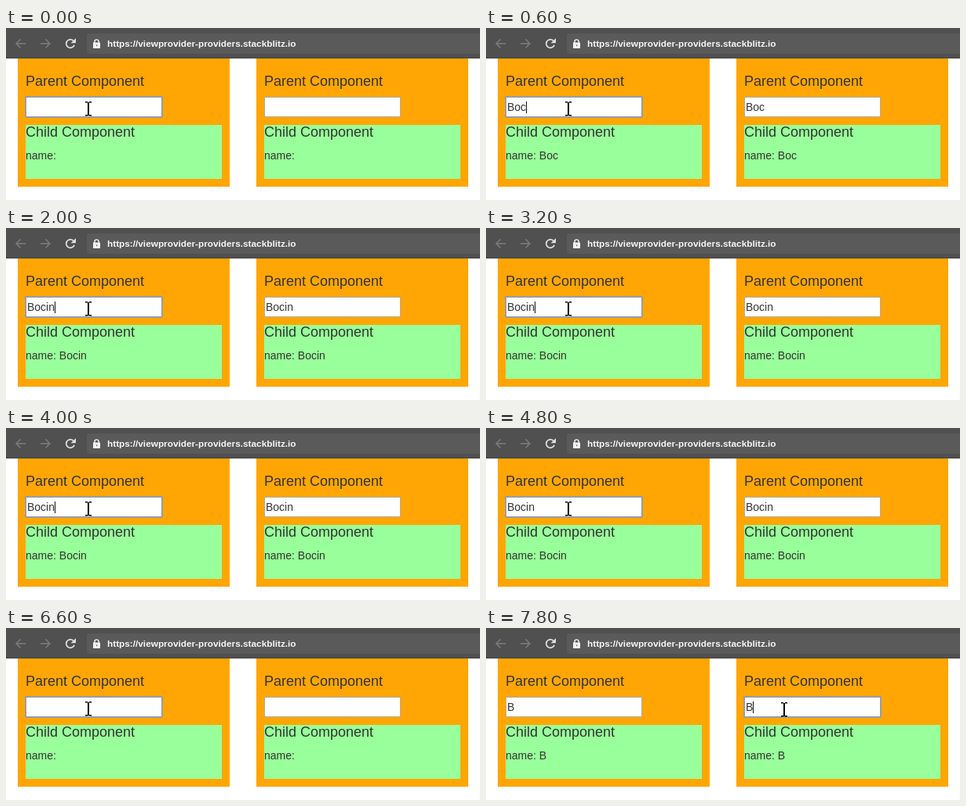
Recreate the animation shown at these times as an HTML page with a canvas. Size 604x220 px, loop 8 s.

```html
<!DOCTYPE html>
<html lang="en">
<head>
<meta charset="utf-8">
<title>Two synced forms</title>
<style>
  html, body { margin: 0; width: 100%; height: 100%; overflow: hidden; background: #fff; }
  canvas { display: block; width: 604px; height: 220px; }
</style>
</head>
<body>
<canvas id="stage"></canvas>
<script>
const W = 604, H = 220, LOOP = 8000, STEP = 200;
const NAME = 'Bocin';
const SANS = '"Liberation Sans", Arial, sans-serif';
const canvas = document.getElementById('stage');
const ctx = canvas.getContext('2d');
const ratio = window.devicePixelRatio || 1;
canvas.width = W * ratio;
canvas.height = H * ratio;
ctx.scale(ratio, ratio);

const clamp = (v, lo, hi) => Math.min(hi, Math.max(lo, v));
const ease = p => p * p * (3 - 2 * p);

function rect(x, y, w, h, color) {
  ctx.fillStyle = color;
  ctx.fillRect(x, y, w, h);
}

function frame(x, y, w, h, color) {
  ctx.strokeStyle = color;
  ctx.lineWidth = 1;
  ctx.strokeRect(x + .5, y + .5, w - 1, h - 1);
}

function text(str, x, y, size, color = '#333', weight = '') {
  ctx.font = `${weight} ${size}px ${SANS}`;
  ctx.fillStyle = color;
  ctx.fillText(str, x, y);
}

function path(points, color, width) {
  ctx.beginPath();
  points.forEach(([x, y]) => ctx.lineTo(x, y));
  ctx.strokeStyle = color;
  ctx.lineWidth = width;
  ctx.stroke();
}

function navArrow(x, dir) {
  const tip = x + dir * 6;
  path([[x - dir * 6, 20], [tip, 20]], '#7b7b7b', 1.6);
  path([[tip - dir * 5.5, 14.5], [tip, 20], [tip - dir * 5.5, 25.5]], '#7b7b7b', 1.6);
}

function reload() {
  ctx.beginPath();
  ctx.arc(82, 20, 5.3, .35, Math.PI * 1.78);
  ctx.strokeStyle = '#dedede';
  ctx.lineWidth = 1.8;
  ctx.stroke();
  ctx.beginPath();
  ctx.moveTo(89, 13);
  ctx.lineTo(89, 19.3);
  ctx.lineTo(82.7, 19.3);
  ctx.fillStyle = '#dedede';
  ctx.fill();
}

function lock() {
  ctx.beginPath();
  ctx.arc(115.5, 17.5, 2.6, Math.PI, 0);
  ctx.lineTo(118.1, 20);
  ctx.moveTo(112.9, 17.5);
  ctx.lineTo(112.9, 20);
  ctx.strokeStyle = '#f2f2f2';
  ctx.lineWidth = 1.4;
  ctx.stroke();
  rect(111, 18.5, 9, 7.5, '#f2f2f2');
  rect(115, 21.5, 1.4, 1.6, '#666');
}

function toolbar() {
  rect(0, 0, W, 39, '#505050');
  ctx.beginPath();
  ctx.roundRect(103, 7, W, 26, 3);
  ctx.fillStyle = '#5a5a5a';
  ctx.fill();
  rect(0, 38, W, 1, '#444');
  navArrow(19, -1);
  navArrow(50, 1);
  reload();
  lock();
  text('https://viewprovider-providers.stackblitz.io', 129, 24, 11.8, '#f6f6f6', 'bold');
}

function panel(x, value, focused, caret) {
  rect(x, 39, 270, 164, '#ffa604');
  text('Parent Component', x + 10, 74, 18);
  rect(x + 10, 88, 174, 26, '#fff');
  frame(x + 10, 88, 174, 26, focused ? '#7f9bd3' : '#b3aaa0');
  if (focused) frame(x + 9, 87, 176, 28, 'rgba(125, 150, 205, .6)');
  text(value, x + 12, 106, 14);
  if (caret) rect(Math.round(x + 12 + ctx.measureText(value).width), 94, 1, 15, '#111');
  rect(x + 10, 124, 250, 69, '#99ff9a');
  text('Child Component', x + 10, 139, 18);
  text('name: ' + value, x + 10, 168, 14);
}

function pointer(x, y) {
  rect(x - 1, y - 8, 2, 17, '#000');
  for (const edge of [y - 9, y + 8]) {
    rect(x - 4, edge, 3, 1.5, '#000');
    rect(x + 1, edge, 3, 1.5, '#000');
  }
}

// One key per step: type, erase, then start again in the right field.
function typed(t) {
  if (t >= 7800) return 1;
  if (t >= 5200) return Math.max(0, 5 - Math.floor((t - 5000) / STEP));
  return clamp(Math.floor(t / STEP), 0, 5);
}

// The caret restarts its blink at every key or click.
function caretOn(t) {
  if (t < STEP) return false;
  let since = t;
  if (t >= 7400) since = t >= 7800 ? 7800 : 7400;
  else if (t >= 5200) since = Math.min(t, 6000);
  else since = Math.min(t, 1000);
  return (t - since) % 1000 < 500;
}

function draw(now) {
  const t = Math.floor(now % LOOP / STEP) * STEP;
  const value = NAME.slice(0, typed(t));
  const right = t >= 7400;
  const caret = caretOn(t);
  rect(0, 0, W, H, '#fefffe');
  toolbar();
  panel(15, value, !right, !right && caret);
  panel(319, value, right, right && caret);
  const p = ease(clamp((t - 6600) / 600, 0, 1));
  pointer(Math.round(105 + 275 * p), Math.round(103 + p));
}

const start = performance.now();
function tick() {
  draw(performance.now() - start);
  requestAnimationFrame(tick);
}
tick();
</script>
</body>
</html>
```
